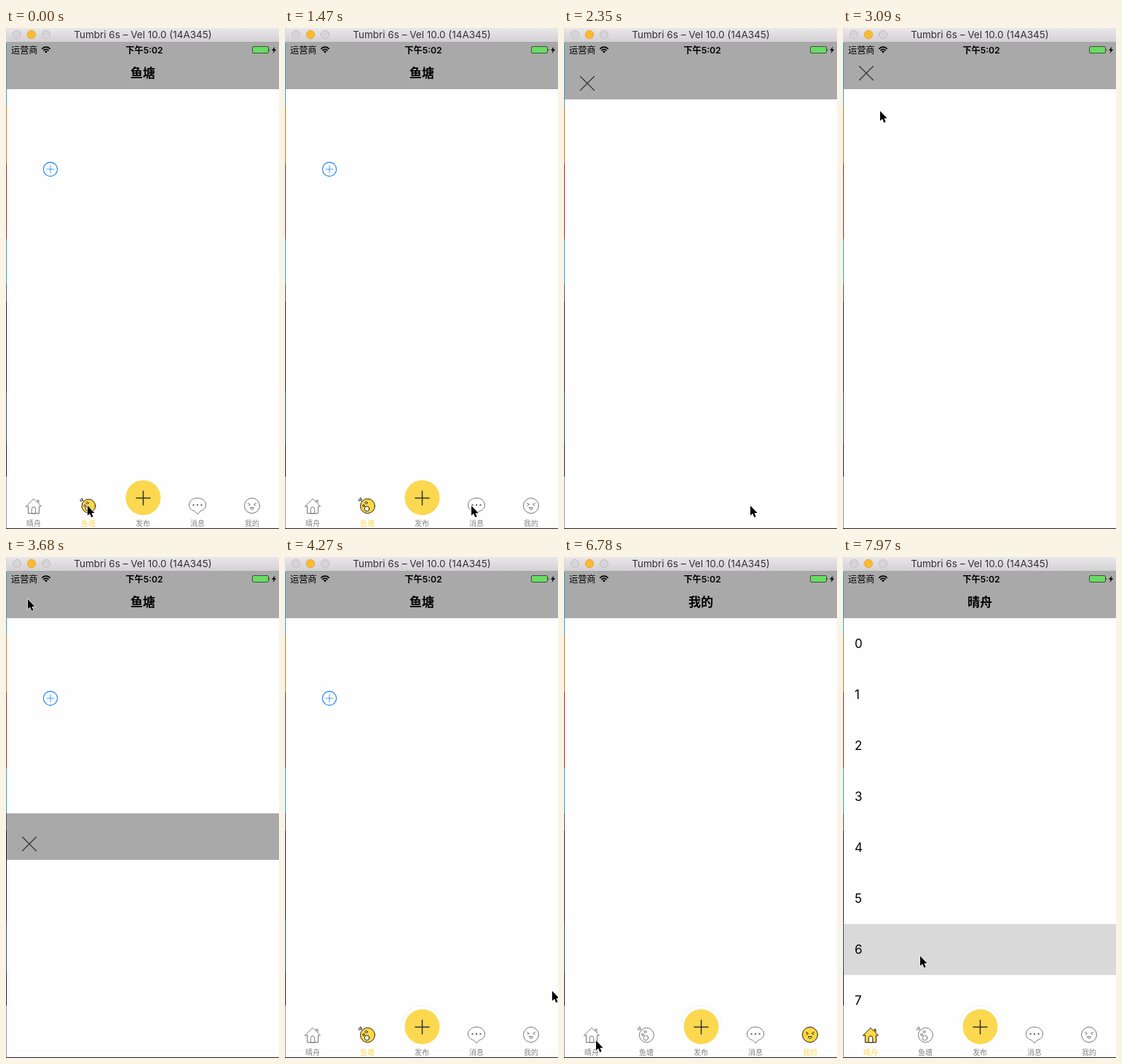
These frames come from a looping animation (375x688 px, 8000 ms). An HTML page:

```html
<!DOCTYPE html>
<html lang="zh">
<head>
<meta charset="utf-8">
<style>
html, body { margin: 0; width: 100%; height: 100%; overflow: hidden; background: #fff; }
svg { display: block; }
text { font-family: Inter, "Noto Sans CJK SC", "Noto Sans CJK", sans-serif; }
.mid { text-anchor: middle; }
.line { fill: none; stroke-linecap: round; stroke-linejoin: round; }
.tab { stroke: #777; fill: none; stroke-linejoin: round; stroke-linecap: round; }
.tab text { stroke: none; fill: #858585; font-size: 10px; }
.tab .dot { fill: #666; stroke: none; }
.tab.on { stroke: #222; }
.tab.on .body { fill: #fdd840; }
.tab.on .hole { fill: #fff; }
.tab.on text { fill: #fbd95a; }
</style>
</head>
<body>
<svg width="375" height="688" viewBox="0 0 375 688">
  <defs>
    <linearGradient id="chrome" x2="0" y2="1">
      <stop stop-color="#e9e7e9"/><stop offset="1" stop-color="#d3d1d3"/>
    </linearGradient>
  </defs>
  <rect width="375" height="688" fill="#fefefe"/>

  <g id="page">
    <rect y="20" width="375" height="64" fill="#a9a9a9"/>
    <text id="title" class="mid" x="188" y="68.3" font-size="17" font-weight="600"></text>
    <g id="add" class="line" stroke="#1a82f7">
      <circle cx="61" cy="194" r="9.6" stroke-width="1.1"/>
      <path d="M56 194h10M61 189v10" stroke-width=".8"/>
    </g>
    <g id="list" font-size="17"></g>
    <circle id="halo" cx="188.5" cy="645" r="29" fill="#fff" stroke="#f0f0f0"/>
    <rect y="639" width="375" height="49" fill="#fefefe"/>
    <circle id="haloFill" cx="188.5" cy="645" r="28.5" fill="#fefefe"/>
    <circle cx="188.5" cy="645" r="24" fill="#fbd850"/>
    <path class="line" d="M179 645.5h19M188.5 636v19" stroke="#333" stroke-width="1.5"/>

    <g class="tab" transform="translate(38 656)">
      <g class="icon">
        <path class="body" d="M-10.500 1L0-9.500L5-4.500V-7.500H7V-2.500L10.500 1H7.500V10.500H-7.500V1Z"/>
        <path class="hole" d="M-2.700 10.500V4.500a2.700 2.700 0 0 1 5.400 0V10.500Z"/>
      </g>
      <text class="mid" y="27.500">晴舟</text>
    </g>
    <g class="tab" transform="translate(113 656)">
      <g class="icon">
        <path class="line" d="M-6.500-6L-9-8.500M-11.500-8.500L-9-11L-8-8L-10.500-6.500Z"/>
        <circle class="body" cx=".5" cy=".5" r="10"/>
        <circle class="hole" cx="-.5" cy="4.300" r="3.300"/>
        <circle class="hole" cx="-5" cy="0" r="1.300"/>
        <circle class="hole" cx="-1.500" cy="-4" r="1.500"/>
      </g>
      <text class="mid" y="27.500">鱼塘</text>
    </g>
    <g class="tab" transform="translate(188 656)"><text class="mid" y="27.500">发布</text></g>
    <g class="tab" transform="translate(263 656)">
      <g class="icon">
        <path class="body" d="M0 11.500L-4 7.500C-9 6-11.500 3-11.500-1C-11.500-6.500-6.500-10.500 0-10.500S11.500-6.500 11.500-1C11.500 3 9 6 4 7.500Z"/>
        <path class="dot" d="M-6.500-2h2v2h-2zM-1-2h2v2h-2zM4.500-2h2v2h-2z"/>
      </g>
      <text class="mid" y="27.500">消息</text>
    </g>
    <g class="tab" transform="translate(338 656)">
      <g class="icon">
        <circle class="body" r="10.500"/>
        <path class="line" d="M-5.500-3.500L-2.500-1.700L-5-.3M5.500-3.500L2.500-1.700L5-.3"/>
        <path class="hole" d="M-2.200 2.500H2.200A2.200 2.800 0 0 1-2.200 2.500Z"/>
      </g>
      <text class="mid" y="27.500">我的</text>
    </g>
  </g>

  <g id="modal">
    <rect y="20" width="375" height="668" fill="#fefefe"/>
    <rect y="20" width="375" height="64" fill="#a9a9a9"/>
    <path class="line" d="M22.500 52.500l19 19M41.500 52.500l-19 19" stroke="#333" stroke-width="1.200"/>
  </g>

  <g id="status" font-size="12.200">
    <rect y="19" width="375" height="1" fill="#a9a9a9"/>
    <text x="7" y="34.500">运营商</text>
    <g class="line" stroke="#000" stroke-width="1.700" stroke-linecap="butt">
      <path d="M49.800 28.300a7.500 7.500 0 0 1 10.400 0M51.900 30.700a4.500 4.500 0 0 1 6.200 0"/>
    </g>
    <path d="M55 34.500l-2-2.200a2.800 2.800 0 0 1 4 0z"/>
    <text class="mid" x="190" y="34.500" font-weight="600">下午5:02</text>
    <rect x="338.500" y="25.500" width="22" height="9" rx="1.500" fill="#68dc62" stroke="#333" stroke-width=".8"/>
    <path d="M361.500 28.500q1.800 1.500 0 3z"/>
    <path d="M369.500 25.500l-4.500 5.300h2.700l-1.200 4.200l4.700-5.700h-2.800z"/>
  </g>

  <rect width="375" height="19" fill="url(#chrome)"/>
  <g stroke-width=".8">
    <circle cx="15" cy="9" r="5.600" fill="#d6d4d6" stroke="#bbb9bb"/>
    <circle cx="35" cy="9" r="5.700" fill="#fcbb2f" stroke="#e0a030"/>
    <circle cx="55" cy="9" r="5.600" fill="#d6d4d6" stroke="#bbb9bb"/>
  </g>
  <text class="mid" x="188" y="14" font-size="13.500" fill="#333">Tumbri 6s – Vel 10.0 (14A345)</text>
  <g id="desk"></g>
  <path d="M0 687.500H375" stroke="#222"/>

  <path id="cursor" d="M0 0V13.500L3.100 10.700L5.300 16L7.600 15L5.500 9.900H9.600Z" stroke="#fff" stroke-width="1.200" paint-order="stroke"/>
</svg>
<script>
const LOOP = 8000, STEP = 147.5;
const $ = id => document.getElementById(id);
const tabs = [...document.querySelectorAll('.tab')];

// Tab taps: [time, tab index]
const taps = [[-150, 1], [4990, 4], [6890, 0]];

// Pointer stops: [time, x, y]
const stops = [
  [0, 112, 656], [960, 112, 656], [1380, 256, 656], [2500, 256, 656],
  [3220, 30, 58], [3720, 30, 58], [4260, 367, 596], [4430, 369, 615],
  [4800, 341, 660], [6050, 341, 660], [6720, 44, 664], [7250, 44, 664],
  [7800, 106, 548], [LOOP, 106, 548]
];

// Strip of desktop left of the window: [top, colour]
const strip = [[0, '#d8d6d8'], [20, '#3a9cc8'], [106, '#c8781c'], [186, '#8c2a20'],
  [290, '#3a9cc8'], [352, '#555'], [376, '#1c1f30'], [500, '#2b4a68'], [570, '#1c1f30'], [616, '#999'], [688]];
$('desk').innerHTML = strip.slice(0, -1).map(([y, c], i) =>
  `<rect y="${y}" width="1" height="${strip[i + 1][0] - y}" fill="${c}"/>`).join('');

$('list').innerHTML = '<rect id="picked" y="504" width="375" height="70" fill="#d9d9d9"/>' +
  Array.from({ length: 8 }, (_, i) => `<text x="16" y="${125 + 70 * i}">${i}</text>`).join('');

const show = (id, on) => $(id).style.display = on ? '' : 'none';
const ease = u => u * u * (3 - 2 * u);

// Critically damped spring, falling from 1 to 0
function spring(ms) {
  const x = Math.max(0, ms) * 0.01826;
  return (1 + x) * Math.exp(-x);
}

function pointer(t) {
  const i = Math.max(1, stops.findIndex(s => s[0] > t));
  const [t0, x0, y0] = stops[i - 1], [t1, x1, y1] = stops[i];
  const u = ease((t - t0) / (t1 - t0));
  return [x0 + (x1 - x0) * u, y0 + (y1 - y0) * u];
}

function draw(t) {
  const [tapTime, active] = taps.filter(p => p[0] <= t).pop();
  const age = t - tapTime;
  const scale = age > 850 ? 1 : 1 + 0.13 * Math.sin(age * 0.03) * Math.exp(-age / 200);
  tabs.forEach((tab, i) => {
    tab.classList.toggle('on', i === active);
    tab.querySelector('.icon')?.setAttribute('transform', `scale(${i === active ? scale : 1})`);
  });
  $('title').textContent = tabs[active].textContent.trim();
  show('add', active === 1);
  show('list', active === 0);
  show('picked', t > 7900);
  show('halo', t > 3600);
  show('haloFill', t > 3600);

  const drop = t < 3582 ? spring(t - 2028) : 1 - spring(t - 3582);
  $('modal').setAttribute('transform', `translate(0 ${Math.round(668 * drop)})`);
  $('cursor').setAttribute('transform', `translate(${pointer(t).map(Math.round)})`);
}

// The picture refreshes in steps
function frame() {
  const t = performance.now() % LOOP;
  draw(Math.max(0, Math.floor((t + 17) / STEP) * STEP - 14));
  requestAnimationFrame(frame);
}
frame();
</script>
</body>
</html>
```
